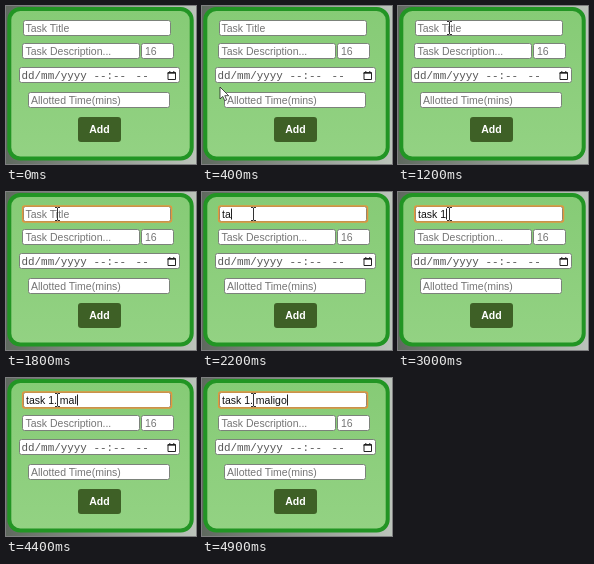
An HTML page that plays this animation: 190 px wide and 158 px high, repeating every 5 s.

```html
<!DOCTYPE html>
<html lang="en">
<head>
<meta charset="utf-8">
<title>Task form</title>
<style>
  html, body { margin: 0; width: 100%; height: 100%; overflow: hidden; }
  svg { display: block; }
  text { font: 10.5px Arial, "Liberation Sans", sans-serif; fill: #757575; white-space: pre; }
  .field { fill: #fff; stroke: #7b827a; rx: 2px; }
  #date { font: 10.9px "Courier New", "Liberation Mono", monospace; fill: #555; }
  #typed { fill: #111; }
  #add { font-weight: bold; fill: #fff; text-anchor: middle; }
</style>
</head>
<body>
<svg width="190" height="158" viewBox="0 0 190 158">
  <defs>
    <linearGradient id="panel" x2="0" y2="1">
      <stop stop-color="#86cb76"/>
      <stop offset="1" stop-color="#93d283"/>
    </linearGradient>
    <linearGradient id="backdrop">
      <stop stop-color="#5f695f"/>
      <stop offset="1" stop-color="#bcc4bb"/>
    </linearGradient>
  </defs>
  <rect width="190" height="158" fill="url(#backdrop)"/>
  <rect x="3.3" y="3" width="182.4" height="149.5" rx="11" fill="url(#panel)" stroke="#229524" stroke-width="4"/>

  <rect class="field" x="17.5" y="14.5" width="147" height="15"/>
  <rect class="field" x="16.5" y="37.5" width="117" height="15"/>
  <rect class="field" x="135.5" y="37.5" width="32" height="15"/>
  <rect class="field" x="13.5" y="61.5" width="160" height="15"/>
  <rect class="field" x="22.5" y="86.5" width="141" height="15"/>
  <rect id="focus" x="16.7" y="14" width="148.8" height="16" rx="2" fill="none" stroke="#e3963e" stroke-width="1.5"/>

  <text id="hint" x="19.5" y="26">Task Title</text>
  <text id="typed" x="20" y="26"></text>
  <text x="19.5" y="49">Task Description...</text>
  <text x="139" y="49">16</text>
  <text id="date" x="15.5" y="73">dd/mm/yyyy --:-- <tspan dx="3">--</tspan></text>
  <text x="25" y="98">Allotted Time(mins)</text>
  <path d="M162 66.5h7.5v7h-7.5zM161.5 67.2h8.5M163.8 65v2M167.8 65v2" fill="none" stroke="#222"/>

  <rect x="72" y="111" width="43" height="25" rx="3" fill="#3e6026"/>
  <text id="add" x="93.5" y="127">Add</text>

  <path id="caret" d="M0 16.5v11" stroke="#222"/>
  <path id="arrow" d="M0 0v12l2.8-2.6 1.9 4.3 2-.9-1.9-4.1h3.9z" fill="#fff" stroke="#222" stroke-width=".8"/>
  <path id="beam" d="M-2.5-6.5h2l.5.5.5-.5h2M0-6v12M-2.5 6.5h2l.5-.5.5.5h2" fill="none" stroke="#333"/>
</svg>
<script>
const LOOP = 5000, STEP = 100;
const byId = id => document.getElementById(id);
const show = (id, on) => byId(id).setAttribute('visibility', on ? 'visible' : 'hidden');
const move = (id, x, y) => byId(id).setAttribute('transform', `translate(${x} ${y})`);

// time, x, y
const path = [
  [300, 4, 128], [400, 18, 81], [800, 48, 40], [1100, 49, 32], [1200, 51, 22]
];

// time, text, caret visible
const typing = [
  [0, '', false], [1400, '', true], [1800, '', false],
  [2000, 't', true], [2100, 'ta', true], [2400, 'tas', true], [2500, 'task', true],
  [2800, 'task ', true], [2900, 'task 1', true], [3400, 'task 1', false],
  [3600, 'task 1.', true], [4100, 'task 1.', false], [4200, 'task 1. ', true],
  [4300, 'task 1. ma', true], [4400, 'task 1. mal', true], [4600, 'task 1. mal', false],
  [4800, 'task 1. malig', true], [4900, 'task 1. maligo', true]
];

function pointerAt(t) {
  const next = path.findIndex(p => p[0] > t);
  if (next < 0) return path.at(-1).slice(1);
  if (next === 0) return path[0].slice(1);
  const [t0, x0, y0] = path[next - 1], [t1, x1, y1] = path[next];
  const k = (t - t0) / (t1 - t0);
  return [x0 + (x1 - x0) * k, y0 + (y1 - y0) * k];
}

function draw(now) {
  const t = Math.floor(now % LOOP / STEP) * STEP;
  const [, text, caretOn] = typing.findLast(s => s[0] <= t);
  const typed = byId('typed');
  typed.textContent = text;
  show('hint', !text);
  show('focus', t >= 1400);
  show('caret', caretOn);
  move('caret', Math.round(20 + typed.getComputedTextLength()) + .5, 0);

  const [x, y] = pointerAt(t);
  const overText = y < 50;
  show('arrow', t >= 300 && !overText);
  show('beam', t >= 300 && overText);
  move('arrow', x, y);
  move('beam', Math.round(x) + .5, y);
}

const start = performance.now();
function tick() {
  draw(performance.now() - start);
  requestAnimationFrame(tick);
}
tick();
</script>
</body>
</html>
```
